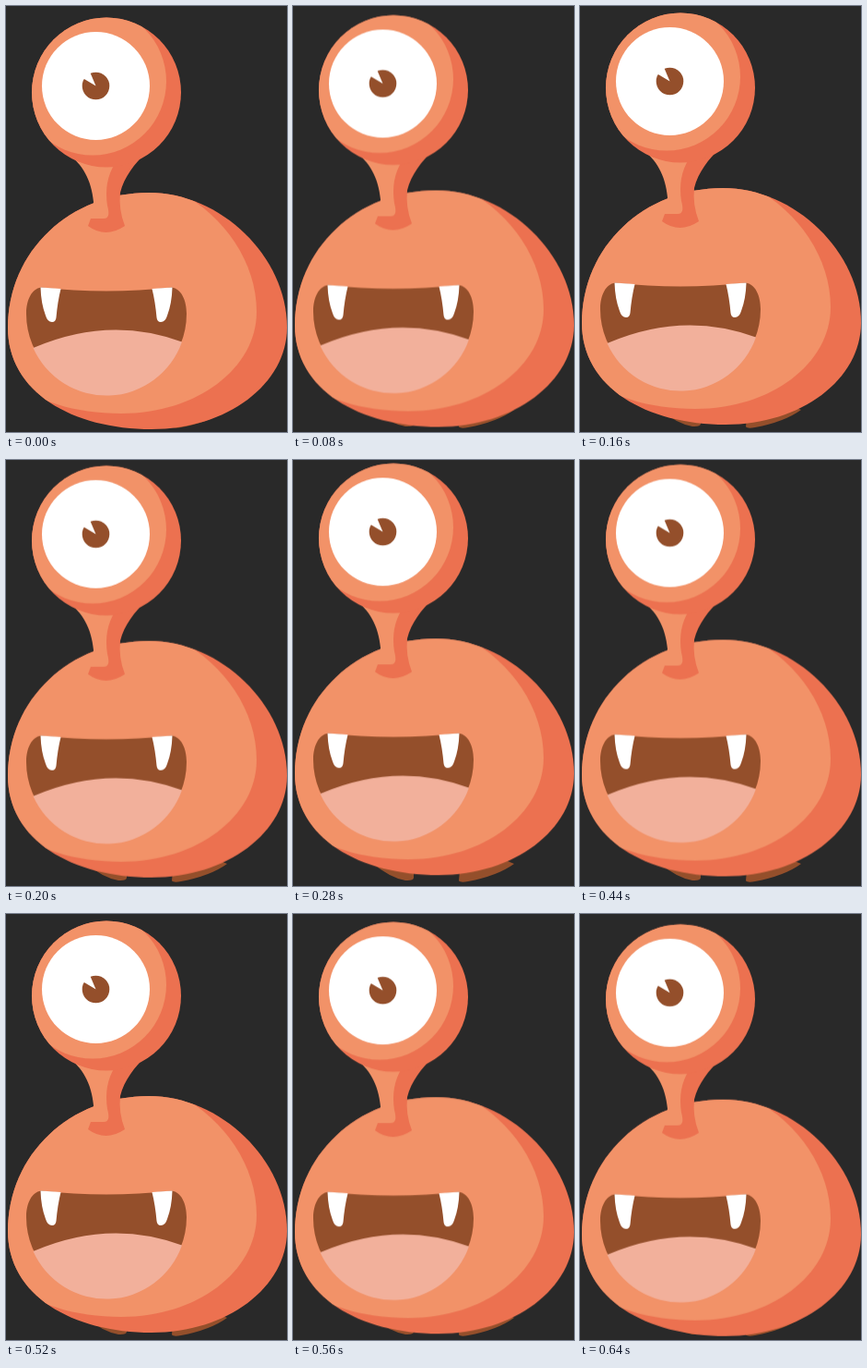
Recreate the animation shown at these times as an HTML page. Size 305 by 461 pixels, loop 680 ms.

```html
<!DOCTYPE html>
<html lang="en">
<head>
<meta charset="utf-8">
<title>Bouncing one-eyed monster</title>
<style>
  html, body { margin: 0; width: 100%; height: 100%; overflow: hidden; background: #292929; }
  svg { display: block; width: 305px; height: 461px; }
  .light { fill: #f29268; }
  .shade { fill: #ec7150; }
  .brown { fill: #944f2b; }
  .white { fill: #fff; }
  .tongue { fill: #f2b09b; }
  .bob { animation: bob 680ms infinite; }
  /* 25 poses per second: nine on the way up, eight on the way down */
  @keyframes bob {
    0% { transform: translateY(0); animation-timing-function: steps(9, jump-none); }
    52.941% { transform: translateY(-10px); animation-timing-function: steps(8, end); }
    100% { transform: translateY(0); }
  }
</style>
</head>
<body>
<svg viewBox="0 0 305 461">
  <defs>
    <path id="body" d="M155 202C233 202 305 271 305 348C305 409 240 458 158 458C72 458 2 418 2 348C2 265 70 202 155 202Z"/>
    <circle id="ball" cx="109" cy="93.5" r="81"/>
    <path id="tooth" d="M37.5 304.5L59.500 306Q56 320 54.500 337Q54 342 50 342Q45 342 43 335Q38 322 37.500 304.500Z"/>
    <clipPath id="bodyClip"><use href="#body"/></clipPath>
    <clipPath id="ballClip"><use href="#ball"/></clipPath>
  </defs>

  <g class="brown">
    <path d="M86 436Q105 452 122 455Q131 455.500 131 452V438Z"/>
    <path d="M181 444L180 455.500Q182 457.500 190 456Q222 450 240 437L228 432Z"/>
  </g>

  <g class="bob">
    <use href="#body" class="shade"/>
    <g clip-path="url(#bodyClip)">
      <use href="#body" class="light" x="-33" y="-17"/>
    </g>

    <path class="light" d="M68 161C82 170 93 188 95 212V232H122V160Z"/>
    <path class="shade" d="M118 171Q106 190 110 216Q114 230 106 230H92L89 238Q108 252 129 238Q122 220 124 202C128 185 141 169 150 161Z"/>

    <use href="#ball" class="shade"/>
    <circle class="light" clip-path="url(#ballClip)" cx="94" cy="81.500" r="80"/>
    <circle class="white" cx="97.5" cy="86.5" r="58.500"/>
    <circle class="brown" cx="97.5" cy="86.5" r="14.800"/>
    <path class="white" d="M90.500 70L97.500 86.500L81.500 77Z"/>

    <path class="brown" d="M38 304.500Q109 312.500 180 304.500C190 306 196 318 196 333A87 87 0 0 1 22 333C22 318 28 306 38 304.500Z"/>
    <path class="tongue" d="M29.500 370Q112 334.500 191 363.500A87 87 0 0 1 29.500 370Z"/>
    <use href="#tooth" class="white"/>
    <use href="#tooth" class="white" transform="matrix(-1 0 0 1 218 0)"/>
  </g>
</svg>
</body>
</html>
```
